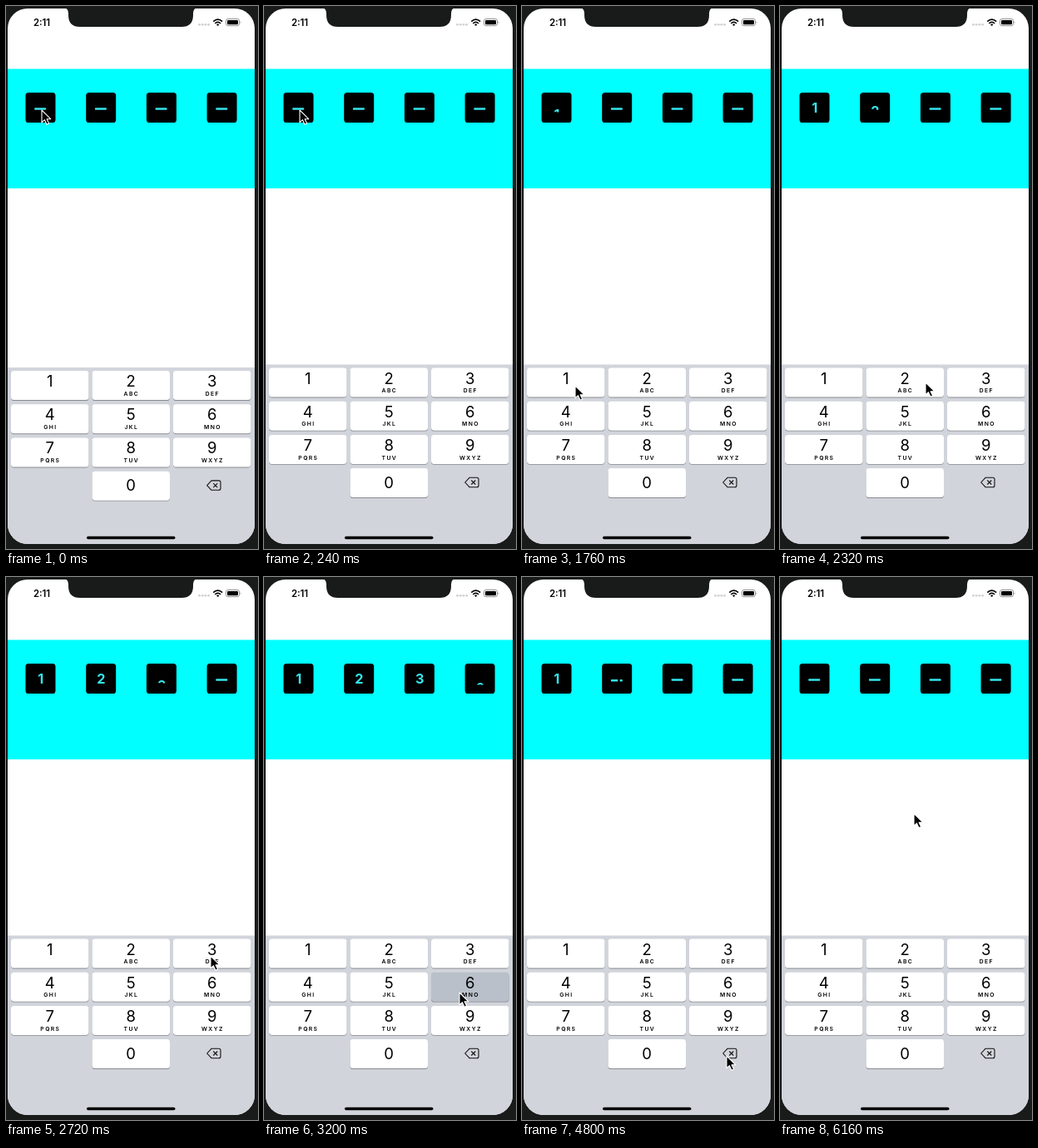
These frames come from a looping animation (303x652 px, 6240 ms). An HTML page:

```html
<!DOCTYPE html>
<html lang="en">
<head>
<meta charset="utf-8">
<title>Code entry</title>
<style>
  html, body { margin: 0; width: 100%; height: 100%; overflow: hidden; background: #191b1b; }
  svg { display: block; width: 100vw; height: 100vh; }
  text { font-family: Inter, "Liberation Sans", sans-serif; text-anchor: middle; }
  .num { font-size: 18.5px; }
  .sub { font-size: 6.8px; font-weight: 600; letter-spacing: 1.4px; }
  .digit { font-size: 16.3px; font-weight: 700; fill: #35e5ec; }
</style>
</head>
<body>
<svg viewBox="0 0 303 652" preserveAspectRatio="none">
  <defs>
    <clipPath id="screen"><rect x="2" y="3" width="297" height="643" rx="24"/></clipPath>
  </defs>
  <rect width="303" height="652" fill="#191b1b"/>
  <g clip-path="url(#screen)">
    <rect width="303" height="652" fill="#fff"/>
    <rect y="75.5" width="303" height="143.5" fill="#0ff"/>
    <g id="boxes"></g>
    <g id="keyboard"><rect y="430.5" width="303" height="240" fill="#d1d4db"/></g>
    <rect x="97" y="636.7" width="106.500" height="3.600" rx="1.800"/>
  </g>
  <path d="M70 2Q75 3 75 9V11Q75 25 89 25H211Q225 25 225 11V9Q225 3 230 2Z" fill="#191b1b"/>
  <text x="43" y="23.700" font-size="11.300" font-weight="600">2:11</text>
  <g fill="#d0d0d2">
    <circle cx="232.500" cy="22.300" r="1.400"/><circle cx="236.200" cy="22.300" r="1.400"/>
    <circle cx="239.900" cy="22.300" r="1.400"/><circle cx="243.600" cy="22.300" r="1.400"/>
  </g>
  <g fill="none" stroke="#000" stroke-width="1.700">
    <path d="M249.300 18.700Q254.700 13.600 260.100 18.700"/>
    <path d="M251.300 21Q254.700 17.800 258.100 21"/>
  </g>
  <path d="M253 22.300Q254.700 20.900 256.400 22.300L254.700 24.100Z"/>
  <rect x="264.500" y="15.500" width="16" height="8.200" rx="2.400" fill="none" stroke="#777" stroke-width=".8"/>
  <rect x="266" y="17" width="13" height="5.200" rx="1.200"/>
  <path d="M281.700 18.200Q283.500 19.600 281.700 21Z" fill="#777"/>
  <path id="cursor" d="M0 0V14.800L3.400 11.700L6 17.300L8.600 16.100L6.100 10.700H10.700Z"
        fill="#000" stroke="#fff" stroke-width="1.100" stroke-linejoin="round"/>
</svg>
<script>
const LOOP = 6240, STEP = 80, FLIP = 640, HOLD = 160;
const byId = id => document.getElementById(id);

function add(parent, tag, attrs, content = "") {
  const node = document.createElementNS("http://www.w3.org/2000/svg", tag);
  for (const name in attrs) node.setAttribute(name, attrs[name]);
  node.textContent = content;
  parent.append(node);
  return node;
}

const slots = [
  { digit: "1", on: 1600, off: 5040 },
  { digit: "2", on: 2000, off: 4640 },
  { digit: "3", on: 2560, off: 4320 },
  { digit: "6", on: 3120, off: 4000 }
];
const path = [
  [0, 43, 125], [960, 43, 125], [1400, 64, 456], [1780, 64, 456],
  [1980, 175, 452], [2340, 175, 452], [2520, 246, 455], [2740, 246, 455],
  [3040, 235, 499], [3320, 235, 499], [3760, 246, 575], [5120, 246, 575],
  [5760, 161, 284], [LOOP, 161, 284]
];

const keyboard = byId("keyboard"), keys = {};
const labels = ["", "ABC", "DEF", "GHI", "JKL", "MNO", "PQRS", "TUV", "WXYZ"];

function addKey(number, column, row, letters) {
  const x = 6 + column * 97.5, y = 434.5 + row * 40.2;
  const size = { x, width: 93.5, height: 35, rx: 3.6 };
  add(keyboard, "rect", { ...size, y: y + 0.9, fill: "#898b90" });
  keys[number] = add(keyboard, "rect", { ...size, y });
  const middle = x + 46.7;
  add(keyboard, "text", { class: "num", x: middle, y: y + (number ? 19 : 23.8) }, number);
  add(keyboard, "text", { class: "sub", x: middle + 0.7, y: y + 29.6 }, letters);
}
labels.forEach((letters, i) => addKey(i + 1, i % 3, Math.floor(i / 3), letters));
addKey(0, 1, 3, "");
add(keyboard, "path", {
  d: "M247 566.3H256Q258 566.3 258 568.3V575.700Q258 577.700 256 577.700H247L241.700 572ZM249.300 569.500L254.300 574.500M254.300 569.500L249.300 574.500",
  fill: "none", stroke: "#111", "stroke-width": 1.1, "stroke-linejoin": "round"
});

slots.forEach((slot, i) => {
  const x = 23.5 + i * 72.7, middle = x + 18.3;
  const boxes = byId("boxes");
  add(boxes, "rect", { x, y: 104, width: 36, height: 36, rx: 3.6 });
  const clip = add(boxes, "clipPath", { id: "reveal" + i });
  slot.window = add(clip, "rect", { x, width: 36 });
  const holder = add(boxes, "g", { "clip-path": `url(#reveal${i})` });
  slot.text = add(holder, "text", { class: "digit", x: middle }, slot.digit);
  slot.dash = add(boxes, "rect", { x: x + 10.7, y: 122.2, width: 14, height: 2.5, rx: 0.8, fill: "#35e5ec" });
  slot.gap = add(boxes, "rect", { x: x + 19, y: 121, width: 2.5, height: 5 });
});

const easeOut = p => 1 - (1 - p) ** 2;
const progress = (t, start) => Math.max(0, Math.min(1, (t - start) / FLIP));
const show = (node, visible) => node.setAttribute("visibility", visible ? "visible" : "hidden");

function cursorAt(t) {
  const i = path.findIndex((point, n) => n && t <= point[0]);
  const [t0, x0, y0] = path[i - 1], [t1, x1, y1] = path[i];
  const p = (t - t0) / (t1 - t0), e = p * p * (3 - 2 * p);
  return [x0 + (x1 - x0) * e, y0 + (y1 - y0) * e];
}

function drawSlot(slot, t) {
  const filled = t >= slot.on && t < slot.off;
  show(slot.text, filled);
  show(slot.dash, !filled);
  const rise = progress(t, slot.on), shift = 14.5 * (1 - easeOut(rise));
  // The digit climbs while the strip that shows it grows taller.
  slot.text.setAttribute("y", 128.3 + shift);
  slot.window.setAttribute("y", 115 + shift);
  slot.window.setAttribute("height", rise < 0.55 ? 2.5 + 7 * rise : 6.4 + 20 * (rise - 0.55));
  const back = progress(t, slot.off);
  const returning = t >= slot.off;
  slot.dash.setAttribute("y", 122.2 + (returning ? 5 * (1 - back) ** 6 : 0));
  show(slot.gap, returning && back < 0.5);
}

function draw(t) {
  keyboard.setAttribute("transform", `translate(0 ${3.6 * Math.max(0, 1 - t / 200) ** 2})`);
  slots.forEach(slot => drawSlot(slot, t));
  for (const number in keys) {
    const pressed = slots.some(s => s.digit === number && t >= s.on && t < s.on + HOLD);
    keys[number].setAttribute("fill", pressed ? "#b9c0ca" : "#fff");
  }
  byId("cursor").setAttribute("transform", `translate(${cursorAt(t)})`);
}

const start = performance.now();
function tick() {
  const t = (performance.now() - start) % LOOP;
  draw(Math.floor(t / STEP) * STEP);
  requestAnimationFrame(tick);
}
draw(0);
requestAnimationFrame(tick);
</script>
</body>
</html>
```
